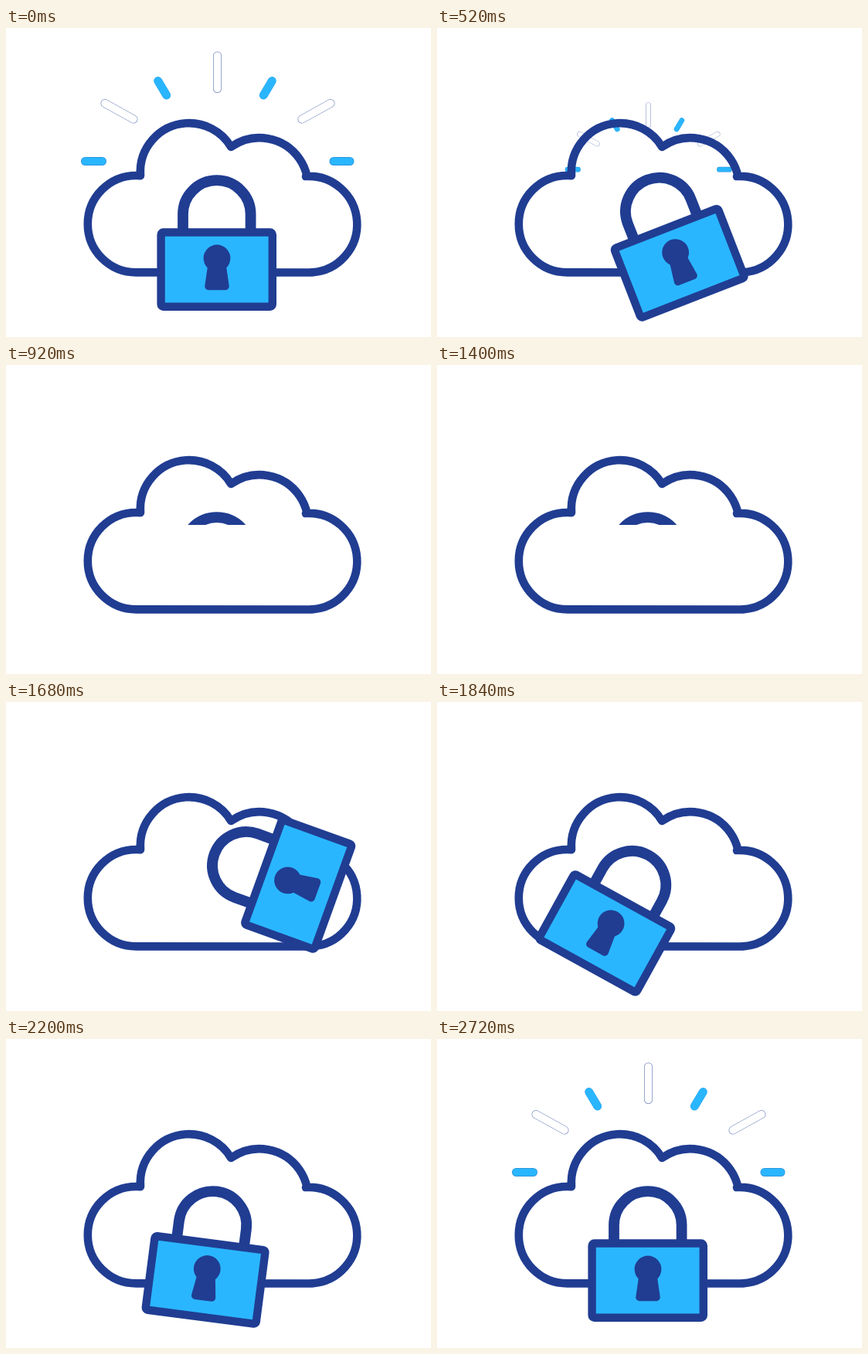
Write an HTML page with a canvas that moves like this. It is 550 px wide and 400 px high and loops after 4.28 s.

```html
<!DOCTYPE html>
<html lang="en">
<head>
<meta charset="utf-8">
<title>Cloud lock</title>
<style>
  html, body { margin: 0; width: 100%; height: 100%; overflow: hidden; background: #fff; }
  canvas { display: block; }
</style>
</head>
<body>
<canvas id="stage" width="550" height="400"></canvas>
<script>
const ctx = document.getElementById('stage').getContext('2d');
const LOOP = 4280, STEP = 40;
const NAVY = '#203d92', SKY = '#2ab6ff', WHITE = '#fff';
const PIVOT = { x: 271, y: 199.3 };
const RAY_CENTER = { x: 273.5, y: 200 };
const LOCK_TOP = 190, LOCK_HEIGHT = 178;

// Each key is [time, value]; values ease in and out between keys.
const SWING = [
  [440, 0], [680, -85], [852, 0], [1440, 0], [1619, -85],
  [1890, 39], [2090, -36], [2240, 16], [2320, 0]
];
const REVEAL = [[760, 1], [960, 0], [1360, 0], [1560, 1]];
const RAYS = [[400, 1], [680, 0], [2440, 0], [2720, 1]];

// Segments: x1, y1, x2, y2, fill, edge
const RAY_LINES = [
  [102.5, 172.5, 124.5, 172.5, SKY, '#2c8fd6'],
  [424, 172.5, 445, 172.5, SKY, '#2c8fd6'],
  [196.7, 68.5, 207.7, 87, SKY, '#2aa6ee'],
  [344.3, 68.5, 333.3, 87, SKY, '#2aa6ee'],
  [128, 97.5, 165, 118, WHITE, '#8292c4'],
  [420, 97.5, 383, 118, WHITE, '#8292c4'],
  [273.5, 36, 273.5, 78.5, WHITE, '#6f82bb']
];

function valueAt(keys, t) {
  if (t <= keys[0][0]) return keys[0][1];
  for (let i = 1; i < keys.length; i++) {
    const [t0, v0] = keys[i - 1], [t1, v1] = keys[i];
    if (t <= t1) {
      const k = (1 - Math.cos(Math.PI * (t - t0) / (t1 - t0))) / 2;
      return v0 + (v1 - v0) * k;
    }
  }
  return keys[keys.length - 1][1];
}

function stroke(color, width) {
  ctx.strokeStyle = color;
  ctx.lineWidth = width;
  ctx.stroke();
}

function arcBetween(cx, cy, x1, y1, x2, y2) {
  ctx.arc(cx, cy, Math.hypot(x1 - cx, y1 - cy),
    Math.atan2(y1 - cy, x1 - cx), Math.atan2(y2 - cy, x2 - cx));
}

function drawCloud() {
  ctx.beginPath();
  arcBetween(168.5, 253.7, 168.5, 316.4, 174, 190.5);
  arcBetween(237, 186.3, 174, 190.5, 292, 153.5);
  arcBetween(328, 205.2, 292, 153.5, 388, 192);
  arcBetween(392, 254.2, 388, 192, 392, 316.4);
  ctx.closePath();
  stroke(NAVY, 10.6);
}

function drawRays(scale) {
  if (scale <= 0) return;
  ctx.save();
  ctx.translate(RAY_CENTER.x, RAY_CENTER.y);
  ctx.scale(scale, scale);
  ctx.translate(-RAY_CENTER.x, -RAY_CENTER.y);
  for (const [x1, y1, x2, y2, fill, edge] of RAY_LINES) {
    ctx.beginPath();
    ctx.moveTo(x1, y1);
    ctx.lineTo(x2, y2);
    stroke(edge, 11);
    stroke(fill, 9.6);
  }
  ctx.restore();
}

function drawKeyhole() {
  ctx.fillStyle = NAVY;
  ctx.beginPath();
  ctx.arc(273, 298, 17.4, 0, Math.PI * 2);
  ctx.fill();
  ctx.beginPath();
  ctx.moveTo(266, 307);
  ctx.lineTo(280, 307);
  ctx.lineTo(284, 334.5);
  ctx.lineTo(262, 334.5);
  ctx.closePath();
  ctx.fill();
  stroke(NAVY, 9.5);
}

function drawLock(angle, reveal) {
  if (reveal <= 0) return;
  ctx.save();
  ctx.translate(PIVOT.x, PIVOT.y);
  ctx.rotate(angle * Math.PI / 180);
  ctx.translate(-PIVOT.x, -PIVOT.y);
  if (reveal < 1) {
    ctx.beginPath();
    ctx.rect(180, LOCK_TOP - 5, 190, 5 + Math.round(LOCK_HEIGHT * reveal));
    ctx.clip();
  }
  ctx.beginPath();
  ctx.moveTo(229, 264);
  ctx.arc(272.8, 241, 43.8, Math.PI, 0);
  ctx.lineTo(316.6, 264);
  stroke(NAVY, 13.8);

  ctx.beginPath();
  ctx.roundRect(200.6, 264.5, 144.2, 96.3, 3);
  ctx.fillStyle = SKY;
  ctx.fill();
  stroke(NAVY, 10.4);
  drawKeyhole();
  ctx.restore();
}

function render(now) {
  const t = Math.floor((now % LOOP) / STEP) * STEP;
  ctx.fillStyle = WHITE;
  ctx.fillRect(0, 0, 550, 400);
  ctx.lineCap = ctx.lineJoin = 'round';
  drawRays(valueAt(RAYS, t));
  drawCloud();
  drawLock(valueAt(SWING, t), valueAt(REVEAL, t));
}

const start = performance.now();
function tick() {
  render(performance.now() - start);
  requestAnimationFrame(tick);
}
tick();
</script>
</body>
</html>
```
